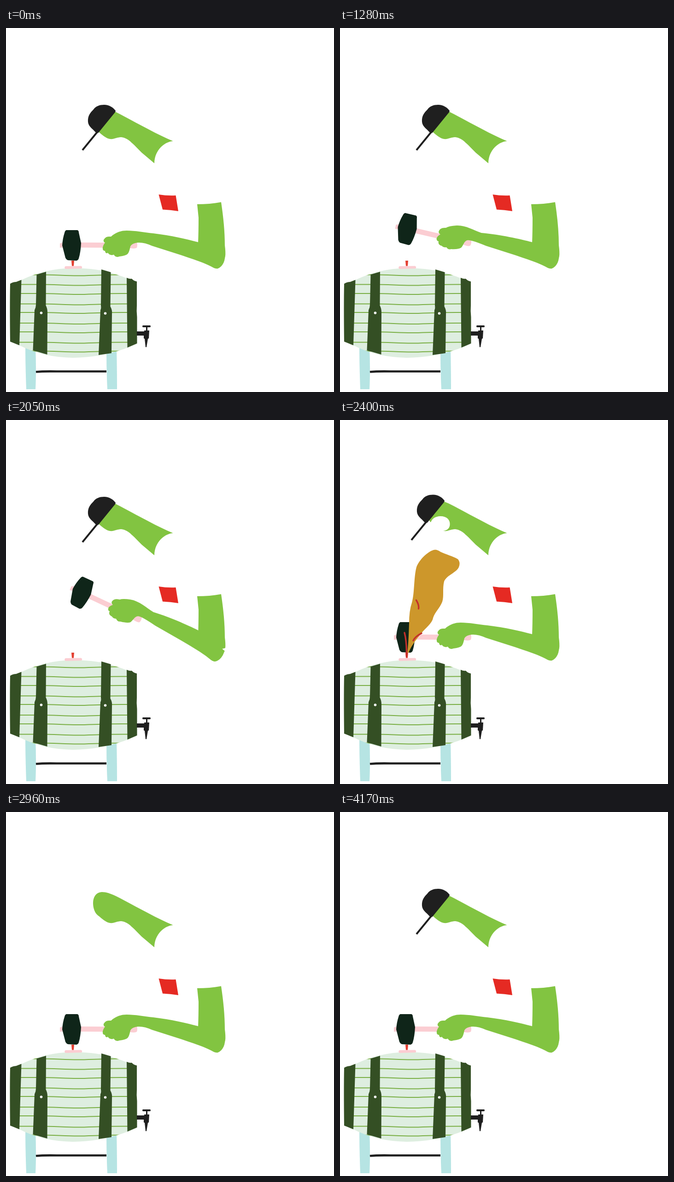
Write an HTML page that moves like this. It is 712 px wide and 787 px high and loops after 4240 ms.

```html
<!DOCTYPE html>
<html lang="en">
<head>
<meta charset="utf-8">
<title>Tapping the keg</title>
<style>
html, body { margin: 0; width: 100%; height: 100%; overflow: hidden; background: #fff; }
svg { display: block; width: 100vw; height: 100vh; }
.green { fill: #82c441; }
.black { fill: #1f1f1f; }
.dark { fill: #344f24; }
.pink { fill: #fbcdd2; }
.leg { fill: #b6e4e3; }
.pale { fill: #deeee0; }
.line { fill: none; stroke: #1f1f1f; }
</style>
</head>
<body>
<svg viewBox="0 0 712 787">
  <defs>
    <path id="body" d="M12 553L33 545Q85 520 145 519Q200 519 240 533L283 548V683Q220 712 145 713Q80 712 29 686L12 678Z"/>
    <clipPath id="inside"><use href="#body"/></clipPath>
  </defs>

  <!-- head, splash, cap -->
  <path class="green" d="M362.500 244.500C325 229 280 203 240 182.500C228 176.500 217 173 208 173C195 174 189 184 189 197C189 208 193 219 200 224C208 230 217 239 226 240C234 241 241 236 250 236C260 237 267 242 275 250C285 259 291 267 300 274L322 292.500C322 268 340 247 362.500 244.500Z"/>
  <path id="foam" fill="#fff" d="M196 226C197 214 207 208 218 208C232 208 239 216 238.500 226C238 235 232 239 223 240L200 240Z"/>
  <g id="cap">
    <path class="black" d="M238 179C233 172 224 166 213 166C203 166 195 169 190 176C183 183 177 190 178 203C179 213 187 217 194 225Q197 229 201 226L237 182Z"/>
    <path class="line" stroke-width="4" d="M198 225L166 264"/>
  </g>
  <path fill="#e52a23" d="M331.500 360Q350 363 368.500 362L374 396Q357 393 340 392.500Z"/>

  <!-- keg -->
  <path class="leg" d="M42 685L64 690Q66 740 64 781H44Q42 730 42 685Z"/>
  <path class="leg" d="M218 695L240 690Q241 740 241 781H220Q218 740 218 695Z"/>
  <path class="line" stroke-width="4.6" d="M65 743.500Q80 742 110 742.500H218"/>
  <use href="#body" class="pale"/>
  <g id="hoops" clip-path="url(#inside)" fill="none" stroke="#7aaf45" stroke-width="2"></g>
  <path class="dark" d="M9 553Q15 549 22 549L33.500 544.500L29 686L9 678Q8 600 9 553Z"/>
  <path class="dark" d="M262 540Q268 543 273 542Q277 547 284 548V600Q283 612 284.500 625V682L263.500 691Z"/>
  <path class="dark" d="M66.500 533L87 527L86.500 600Q90 606 90 615L89.500 706L58.500 697L62 610Q65 604 65 598Z"/>
  <path class="dark" d="M207 522L227.500 528L226.500 602Q231 610 230 618L229 703L201 707L205 610Q207 606 206 600Z"/>
  <g fill="#fff"><circle cx="76.500" cy="616" r="2.800"/><circle cx="215.500" cy="617" r="2.800"/></g>
  <path class="black" d="M284 656H300V654H304V647H297Q295 645 297 643H313Q315 645 313 647H307V654H311L310 671L308 672L305 690H303L301 672L299 671V665H284Z"/>
  <path class="pink" d="M129 515L163 514.500Q167 517 164 520L129 521Q125 518 129 515Z"/>
  <path fill="#e33f31" d="M142 503H148L147 514.500H143Z"/>

  <!-- arm and mallet -->
  <path class="green" d="M415 381Q442 381 467 376.500C472 410 475 440 475 470Q477 485 476 493L450 500L417 465Q418 440 418 410Q417 400 415 381Z"/>
  <g id="swing">
    <g id="mallet">
      <path class="pink" d="M117 466L123 463.500L215 464L284 463Q286 470 284 475Q280 478 270 476L215 475L123 474.500L117 475Z"/>
      <path fill="#0f2519" d="M131 437L155 437Q158 438 158 442L163 465Q162 485 158 498Q157 502 153 503L134 502Q131 501 129 497L122 470Q123 455 127 443Q128 438 131 437Z"/>
    </g>
    <path id="arm" class="green"/>
  </g>

  <!-- beer jet -->
  <g id="jet">
    <path fill="#cd972b" d="M146 503C148 490 149 470 150 440Q150 412 156 395C162 375 160 340 166 318C172 302 190 285 203 281Q210 279 218 285C230 291 245 294 256 301Q262 308 258 318C253 330 232 335 226 349C222 365 226 380 222 393C216 408 206 415 202 428C200 440 185 450 175 463C165 475 155 488 149 503Z"/>
    <path fill="none" stroke="#c4302b" stroke-width="3.400" stroke-linecap="round" d="M165.500 389.500Q172 400 170.500 408M159 477Q163 468 177 461M140 460Q144 475 144.500 500V511"/>
  </g>
</svg>
<script>
const $ = id => document.getElementById(id);
const set = (id, name, value) => $(id).setAttribute(name, value);
const show = (id, on) => set(id, 'visibility', on ? 'visible' : 'hidden');

const elbow = 'L380 491C400 498 430 507 448 517Q455 521 460 520Q470 516 474 503L476 493L417 463';
const armDown = 'M417 463C390 456 360 449 320 444C300 442 280 438 262 438C250 438 238 442 228 451C222 451 217 450 212 458Q211 463 215 464Q211 469 210 474Q209 482 215 482Q216 489 221 486Q226 493 234 490Q238 497 246 494Q256 493 262 490C266 488 268 482 270 472Q274 465 286 464Q300 463 317 471' + elbow;
const armUp = 'M417 463C390 456 350 447 307 443C290 437 272 426 253 427Q236 428 230 432Q216 431 214 441Q215 445 218 446Q208 452 210 458Q211 461 214 461Q212 469 221 471Q225 475 231 474Q235 480 241 478Q256 479 263 475C268 470 269 461 276 459Q283 457 317 471' + elbow;

const LOOP = 4240, STEP = 70, HIT = 18, GONE = 29;
const lift = [0, 1, 2, 3, 2, 1];
const swing = [0, 0, 12, 19];
const jetSize = [.35, .65, .88, 1, 1.07, 1.1, 1.05, .95, .78, .55, .3];

$('hoops').innerHTML = [534, 555, 574.5, 597, 615.5, 638.5, 657.5, 680, 699].map(y =>
  `<path d="M25 ${y - .5}H66C100 ${y - 1} 125 ${y + 1.5} 155 ${y + 1.5}S210 ${y - 1} 264 ${y - .5}"/>`).join('');

// step number: 0 rest, 1-28 action, 29 bare head, 30-33 cap drops
function stepAt(t) {
  if (t < 1000) return 0;
  if (t < 2960) return 1 + Math.floor((t - 1000) / STEP);
  return t < 3960 ? GONE : 30 + Math.floor((t - 3960) / STEP);
}

function drawArm(n) {
  const level = n < HIT ? lift[n % 6] : 0;
  set('arm', 'd', level ? armUp : armDown);
  set('mallet', 'transform', level ? 'translate(0 -4) rotate(12.7 284 468)' : '');
  set('swing', 'transform', `rotate(${swing[level]} 446 490)`);
}

function drawCap(n) {
  let x = 0, y = 0, turn = 0;
  const k = n - 21;
  if (n > GONE) y = -55 * (33 - n);
  else if (k >= 0) {
    x = -11 + 10 * k * k;
    y = -4.5 - 70 * k + 8.7 * k * k;
    turn = 12 * k;
  }
  show('cap', n !== GONE);
  set('cap', 'transform', `translate(${x} ${y}) rotate(${turn} 205 205)`);
}

function drawJet(n) {
  const size = jetSize[n - HIT];
  show('jet', size);
  if (size) set('jet', 'transform', `translate(146 512) scale(${size}) translate(-146 -512)`);
  const k = n - 21;
  show('foam', Math.abs(k) < 2);
  set('foam', 'transform', `translate(${8 * k} ${-45 * k})`);
}

function frame() {
  const n = stepAt(performance.now() % LOOP);
  drawArm(n);
  drawCap(n);
  drawJet(n);
  requestAnimationFrame(frame);
}
frame();
</script>
</body>
</html>
```
